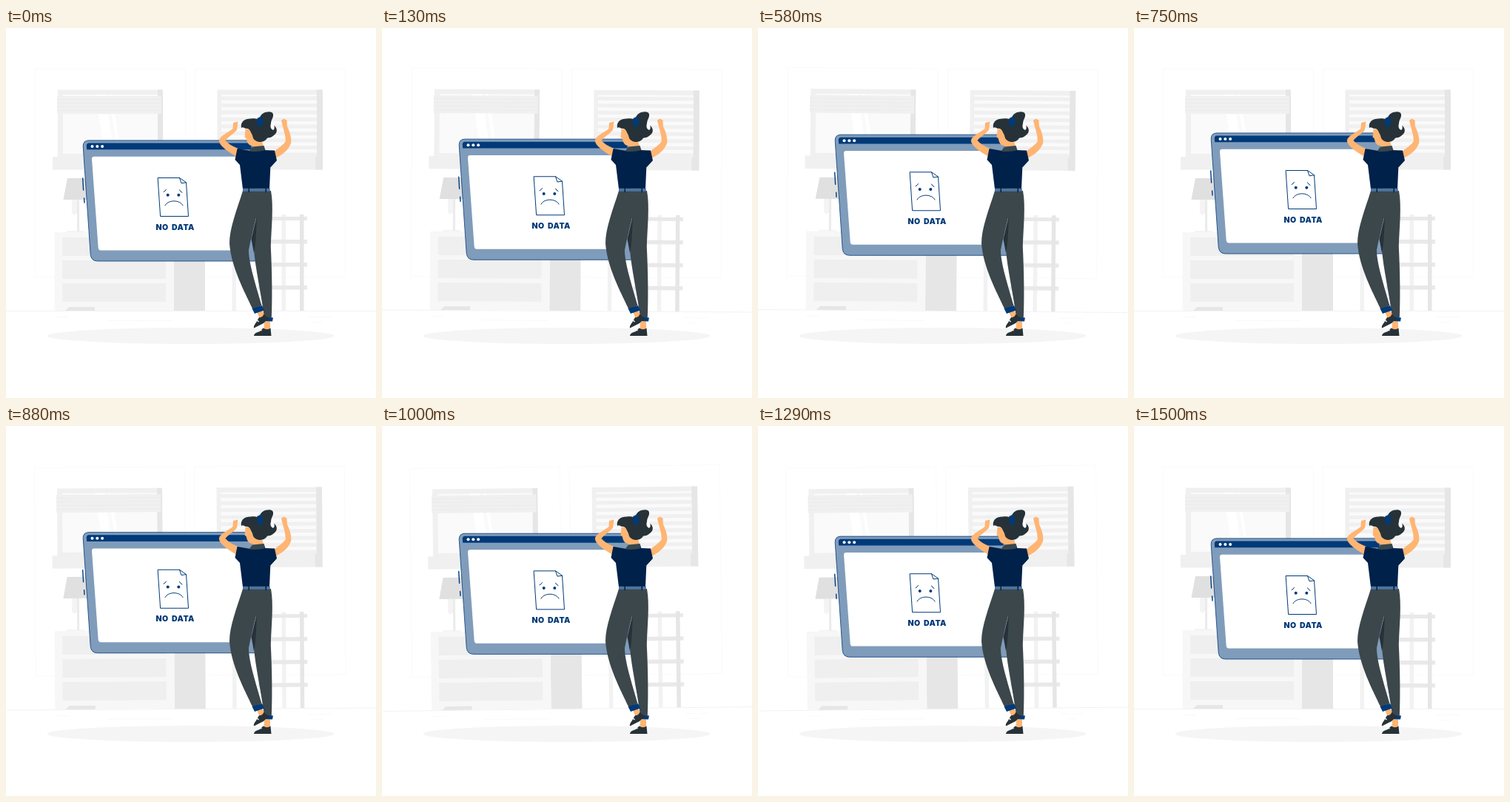
An HTML page for the animation above (1.54 s loop, 500 px wide and 500 px high).

```html
<!DOCTYPE html>
<html lang="en">
<head>
<meta charset="utf-8">
<title>No data</title>
<style>
html, body { margin: 0; height: 100%; overflow: hidden; background: #fff; }
svg { display: block; width: 100vw; height: 100vh; }
.skin { fill: #ffb573; }
.hair { fill: #263238; }
.navy { fill: #002149; }
.blue { fill: #003a78; }
.pants { fill: #3c474c; }
.line { fill: none; stroke: #003a78; stroke-linecap: round; stroke-linejoin: round; }
text { font: 900 10.5px Inter, sans-serif; letter-spacing: .4px; word-spacing: 2px; }
</style>
</head>
<body>
<svg viewBox="0 0 500 500">
  <g id="room">
    <g fill="none" stroke="#fafafa">
      <rect x="39.5" y="55" width="203" height="282" rx="1"/>
      <rect x="255.5" y="55" width="203" height="282" rx="1"/>
    </g>
    <path d="M0 382.500H500" stroke="#f2f2f2"/>
    <path d="M137 395.500H225M66 390.500H85M408 390.500H440M415 397.500H428" stroke="#f9f9f9"/>

    <path d="M70 83.500H212V176H70Z" fill="#f0f0f0"/>
    <path d="M205 83.500H212V176H205Z" fill="#e6e6e6"/>
    <path d="M77 90H205V170H77Z" fill="#fafafa"/>
    <path d="M121 90H134L146 170H133ZM139 90H143L155 170H151Z" fill="#fff"/>
    <path d="M69 92H210V116H69Z" fill="#f0f0f0"/>
    <path d="M69 96.500H210M69 101.500H210M69 106.500H210M69 111.500H210" stroke="#ebebeb"/>
    <path d="M63 174H213V191.500H63Z" fill="#f0f0f0"/>

    <path d="M285.500 83.500H428V176H285.500Z" fill="#f0f0f0"/>
    <path d="M420 83.500H428V176H420Z" fill="#e6e6e6"/>
    <path d="M291 90H420V170H291Z" fill="#fafafa"/>
    <g id="blinds" stroke="#f0f0f0" stroke-width="5"></g>
    <path d="M278 174H428V191.500H278Z" fill="#f0f0f0"/>
    <path d="M418 174H428V191.500H418Z" fill="#e6e6e6"/>

    <path d="M89 232H96V250L92.500 253L89 250ZM82 274H106V277H82Z" fill="#f4f4f4"/>
    <path d="M96 232H99V275H96Z" fill="#ebebeb"/>
    <path d="M83 203H113L118 232H77.500Z" fill="#e0e0e0"/>

    <path d="M227 276H269V382H227Z" fill="#e6e6e6"/>
    <path d="M65.500 276H227V382H65.500Z" fill="#f7f7f7"/>
    <path d="M76 283H216V308H76ZM76 314H216V339H76ZM76 345H216V370H76Z" fill="#efefef"/>
    <path d="M80 382L85 377H120V382Z" fill="#e6e6e6"/>

    <path d="M305.500 252H311V382H305.500ZM372.500 252H378V382H372.500Z" fill="#f2f2f2"/>
    <path d="M340 255H407V260H340ZM340 286H407V291.500H340ZM340 317H407V322.500H340ZM340 348H407V353.500H340Z" fill="#e9e9e9"/>
    <path d="M397 252H402.500V382H397Z" fill="#e6e6e6"/>
  </g>

  <ellipse cx="249.500" cy="416" rx="194" ry="11" fill="#f5f5f5"/>

  <g id="device">
    <path d="M112 151.900H326Q334 151.900 335 160L345 305Q346 315 337 315H124Q115 315 114.200 306L104.200 160Q104 151.900 112 151.900Z" fill="#809cbb" stroke="#003a78" stroke-width=".8"/>
    <path class="blue" d="M112 155.500H327Q331 155.500 331.500 160V164.300H109.200L108.800 159.500Q108.800 155.500 112 155.500Z"/>
    <g fill="#fff">
      <circle cx="116.500" cy="160" r="2"/>
      <circle cx="123.300" cy="160" r="2"/>
      <circle cx="130.100" cy="160" r="2"/>
      <path d="M119 173.800H316Q319 173.800 319.300 177L328 297Q328 300.400 325 300.400H128Q125 300.400 124.700 297L116 177Q116 173.800 119 173.800Z"/>
    </g>
    <path class="line" stroke-width="1.400" d="M103.700 203L104.600 219M105.600 230L106 236"/>
    <path class="line" d="M205.500 202.500H234.500L243.500 208.800L246.500 254.500H209ZM234.500 202.500L237 209.800L243.500 208.800"/>
    <path class="line" d="M213 221.500Q215.500 220.500 216.500 218.300M234.500 218.800Q235.500 221.300 238 222.300M215 239.800C219 231.800 235 231.800 239 239.800"/>
    <circle class="blue" cx="218.700" cy="225.700" r="2"/>
    <circle class="blue" cx="233.300" cy="225.700" r="2"/>
    <text class="blue" x="228.700" y="272.700" text-anchor="middle">NO DATA</text>
  </g>

  <g id="woman">
    <path class="skin" d="M307 128L313.500 126.500L312 137.500C308 143 300 147 296.500 152C300 156 306 160 314 163L311 173.500C300 167 288 159 287.800 152C289 145 300 142 306.500 136Z"/>
    <path class="skin" d="M372 125L375 122.500L379.500 124.500L380 133C384 141 386 149 385.300 155C382 165 374 171 365 175.500L362 167C368 162 376 157 377.800 153C378 147 376 140 374 133Z"/>
    <path class="skin" d="M323.500 137L334 135L345 150L348.500 161L333 167L333 159Q328 159 326 154L324.500 149L322.500 147.500Z"/>
    <path class="hair" d="M318 135C316.500 127 322 122.500 331 122.500C344 121 355 130 355 141C355 150 349 154.500 342 154Q334 153 333 145L329.500 138Q327 135 324 136Q320 133 318 135Z"/>
    <path class="hair" d="M343 121C345 114 355 111.500 360 114.500C364 120 356 125 359 130C367 133 368 141 362 145C357 150 350 149 348 146L344 132Z"/>
    <path d="M360 124C357 130 356 136 361 138Q364 136 362 131" fill="#fff"/>
    <path class="blue" d="M339.500 122L345.500 119Q348 124 346.500 132L342 134Q338 129 339.500 122Z"/>
    <path class="navy" d="M312.500 163L330 166L349 165L363 165.500L366 179L357.300 188.500L356 217.500H320L316 185L309.500 178Z"/>
    <path d="M333 160.500L348.500 159L350.500 165Q340 168 328.500 166.500Z" fill="#37474f"/>

    <path class="pants" d="M320 220C312 246 302 270 302 291C304 322 322 356 333.500 380L345.500 375C337 345 328 318 328 300C333 275 340 250 345 220Z"/>
    <path class="pants" d="M325 220H358C362 241 358.500 270 357.800 296C359.500 330 360 365 358.800 392L349 391C345 360 337 325 335 300C332 285 335 270 338 259Z"/>
    <path class="hair" d="M339 255L331.500 285L335 304C338 290 338 274 339 255Z"/>
    <path d="M320 216.800H356.800V220.800H320Z" fill="#4c759f"/>
    <path class="navy" d="M327.500 216H329V222H327.500ZM350.500 216H352V222H350.500Z"/>

    <path class="skin" d="M339 384L346.500 382L350.500 391L343 393ZM349.500 395H357V409H348Z"/>
    <path class="blue" d="M332.500 379L346 375L349 381.500L336 386ZM348 390.500L361 391.500L360 396.500L349 396Z"/>
    <path class="hair" d="M348.500 386.500L354.500 392.500L348 399L335 405.500Q334 403 338 398L342 391Q346 392 348.500 386.500ZM357.500 405.500L358.500 416H335Q335 412 343 410L347.500 405.500Q353 409 357.500 405.500Z"/>
    <path d="M338 394L341.500 397M342 406.500L345.500 409" stroke="#fff" stroke-width="1.500"/>
  </g>
</svg>
<script>
const CYCLE = 1500;
const LOOP = 1540; // the rest pose holds for the last 40 ms
const room = document.getElementById("room");
const device = document.getElementById("device");

let slats = "";
for (let y = 95; y < 172; y += 9.5) slats += `<path d="M288 ${y}H420"/>`;
document.getElementById("blinds").innerHTML = slats;

// Triangle wave: 0 at the start, 1 halfway, back to 0
const triangle = p => 1 - Math.abs(1 - 2 * (p % 1));

function draw(now) {
  const p = Math.min(now % LOOP, CYCLE) / CYCLE;
  const sway = 2 * triangle(p + 0.25) - 1;
  room.setAttribute("transform", `rotate(${sway} 250 250)`);
  device.setAttribute("transform", `translate(0 ${-10 * triangle(p)})`);
}

const start = performance.now();
function tick() {
  draw(performance.now() - start);
  requestAnimationFrame(tick);
}
tick();
</script>
</body>
</html>
```
